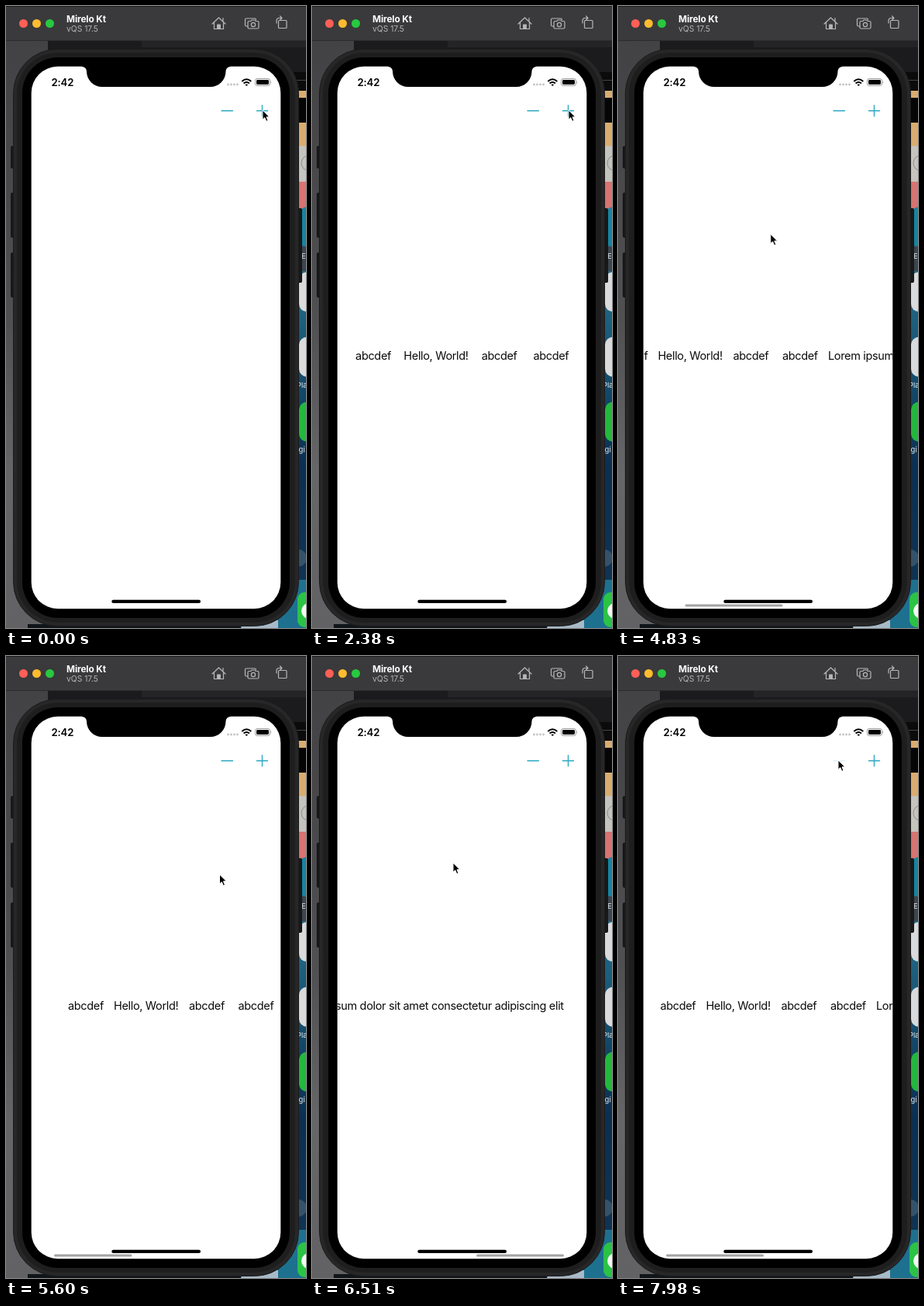
These frames come from a looping animation (387x800 px, 8 s). An HTML page:

```html
<!DOCTYPE html>
<html lang="en">
<head>
<meta charset="utf-8">
<title>Scrolling row</title>
<style>
html, body { margin: 0; width: 100%; height: 100%; overflow: hidden; background: #000; }
svg { display: block; width: 100vw; height: 100vh; }
text { font-family: Inter, "Liberation Sans", sans-serif; }
#row text { font-size: 14.5px; letter-spacing: -.34px; fill: #0a0a0a; }
.label { font-size: 9.5px; fill: #e4e8ea; }
.icon { fill: none; stroke: #b7b6b8; stroke-width: 1.2; stroke-linejoin: round; stroke-linecap: round; }
.tint { stroke: #2fa9c2; stroke-width: 1.4; stroke-linecap: round; fill: none; }
</style>
</head>
<body>
<svg viewBox="0 0 387 800" preserveAspectRatio="none">
  <defs>
    <linearGradient id="wall" x2="0" y2="1">
      <stop offset="0" stop-color="#414143"/><stop offset=".5" stop-color="#505052"/>
      <stop offset=".75" stop-color="#666668"/><stop offset="1" stop-color="#626265"/>
    </linearGradient>
    <linearGradient id="sea" x2="0" y2="1">
      <stop offset="0" stop-color="#3a86a0"/><stop offset=".4" stop-color="#1f6482"/>
      <stop offset=".7" stop-color="#0a2f51"/><stop offset="1" stop-color="#123553"/>
    </linearGradient>
    <clipPath id="screen"><rect x="33" y="78" width="321" height="697" rx="34"/></clipPath>
  </defs>

  <!-- desktop behind the device -->
  <rect width="387" height="800" fill="url(#wall)"/>
  <rect x="54" y="45" width="333" height="50" fill="#1b1b1d"/>
  <rect x="175" y="45" width="212" height="8" fill="#242426"/>
  <rect x="370" y="85" width="17" height="715" fill="#0b0b0b"/>
  <path d="M370 95.500h17" stroke="#444"/>
  <rect x="300" y="109" width="87" height="691" fill="url(#sea)"/>
  <rect x="370" y="109" width="17" height="71" fill="#d9ad70"/>
  <rect x="370" y="118" width="17" height="32" fill="#050505"/>
  <rect x="370" y="180" width="17" height="46" fill="#c5c3be"/>
  <circle cx="391" cy="202" r="10" fill="none" stroke="#8d8d8d"/>
  <rect x="370" y="226" width="17" height="35" fill="#d77370"/>
  <rect x="370" y="309" width="17" height="32" fill="#3b4650"/>
  <g id="apps"></g>
  <circle cx="377" cy="710" r="11" fill="#34536b"/>
  <rect x="340" y="738" width="47" height="62" fill="#1d718f"/>
  <rect x="376" y="754" width="36" height="45" rx="9" fill="#2bc346"/>
  <circle cx="391" cy="778" r="10" fill="#f3f8f3"/>
  <text class="label" x="381" y="325">E</text>
  <text class="label" x="375" y="491">Pla</text>
  <text class="label" x="372" y="574">ngi</text>
  <path d="M28 795h275v5h-275z" fill="#101519"/>
  <path d="M303 800q2-10 14-10h34v10z" fill="#a8bac8"/>

  <!-- device body -->
  <g fill="#18181a">
    <rect x="6" y="180" width="6" height="29" rx="2"/>
    <rect x="6" y="240" width="6" height="58" rx="2"/>
    <rect x="6" y="317" width="6" height="58" rx="2"/>
    <rect x="375" y="260" width="7" height="96" rx="2"/>
  </g>
  <rect x="9.500" y="55.500" width="368" height="742" rx="57" fill="#272728" stroke="#1b1b1c"/>
  <rect x="14" y="60" width="359" height="733" rx="53" fill="#1e1e1f"/>
  <rect x="21" y="66" width="345" height="721" rx="46" fill="#000"/>
  <rect x="32.700" y="77.800" width="321.600" height="697.400" rx="34" fill="#fff"/>

  <g clip-path="url(#screen)">
    <g id="row"></g>
    <rect id="thumb" y="769.500" height="3" rx="1.500" fill="#a3a3a3"/>
  </g>
  <path d="M98 77v1a6 6 0 0 1 6 6a20 20 0 0 0 20 20h139.500a20 20 0 0 0 20-20a6 6 0 0 1 6-6v-1z"/>
  <rect x="136.300" y="763.700" width="114.700" height="4.300" rx="2.100"/>

  <!-- status bar -->
  <text x="58.500" y="102.500" font-size="13.200" font-weight="600" letter-spacing="-.15">2:42</text>
  <path d="M286.500 101h13" stroke="#c3c3c5" stroke-width="2.800" stroke-linecap="round" stroke-dasharray="0 4"/>
  <g fill="none" stroke="#000" stroke-width="2">
    <path d="M304.300 97q6-5.400 12 0"/><path d="M306.600 99.600q3.700-3.300 7.400 0"/>
  </g>
  <path d="M308.500 101.200q1.800-1.500 3.600 0l-1.800 1.900z"/>
  <rect x="321.500" y="93.500" width="19" height="9" rx="2.600" fill="none" stroke="#9a9a9a"/>
  <rect x="323" y="95" width="16" height="6" rx="1.400"/>
  <path d="M341.700 96.500q1.800 1.500 0 3z" fill="#9a9a9a"/>

  <path id="minus" class="tint" d="M278 134.700h14.500"/>
  <path id="plus" class="tint" d="M323.500 134.700h14M330.500 127.700v14"/>

  <!-- window bar -->
  <rect width="387" height="45" fill="#3a393b"/>
  <path d="M0 .5h387" stroke="#1c1c1d"/>
  <path d="M0 44.500h387" stroke="#2b2a2c"/>
  <circle cx="22.500" cy="22.500" r="5.500" fill="#fe5f57"/>
  <circle cx="39.500" cy="22.500" r="5.500" fill="#febc2e"/>
  <circle cx="56.500" cy="22.500" r="5.500" fill="#28c840"/>
  <text x="78" y="21" font-size="11.800" font-weight="700" fill="#fff" letter-spacing="-.1">Mirelo Kt</text>
  <text x="78" y="33" font-size="10.300" fill="#b5b4b6">vQS 17.5</text>
  <g class="icon">
    <path d="M266 23l8.500-8 8.500 8M268.500 21.500v8h12v-8M280 19v-3.500"/>
    <path d="M272.700 29v-5h3.600v5z" fill="#b7b6b8"/>
    <path d="M312 26h-2q-1.500 0-1.500-1.500v-7q0-1.500 1.500-1.500h11q1.500 0 1.500 1.500"/>
    <path d="M313.500 19.500h2.500l1-1.500h4l1 1.500h2.500q1.500 0 1.500 1.500v6.500q0 1.500-1.500 1.500h-11q-1.500 0-1.500-1.500v-6.500q0-1.500 1.500-1.500z"/>
    <circle cx="319" cy="24" r="2.600"/>
    <rect x="351.500" y="18.500" width="10.500" height="10" rx="1"/>
    <path d="M349 22v-3q0-3.500 3.500-3.500h3M353.500 13l2.500 2.500-2.500 2.500"/>
  </g>

  <path id="cursor" d="M0 0v12.200l2.800-2.600 2 4.700 2.200-.9-2-4.600h3.900z" stroke="#fff"/>
</svg>
<script>
const LOOP = 8000, TICK = 70;
const LEFT = 33, WIDTH = 321, INSET = 14.7, GAP = 13.5;
const MAX = 347, BAR = 62, THUMB = 126, TRAVEL = 137;

const words = ["abcdef", "Hello, World!", "abcdef ", "abcdef",
  "Lorem ipsum dolor sit amet consectetur adipiscing elit"];
const widths = [45.5, 83.5, 50, 45.5, 351];
const clicks = [280, 910, 1330, 1960, 2870];

// [time, value] turning points of the drags and flicks
const swipes = [[3990, 0], [4550, 62], [4830, 62], [5320, 0], [5530, 0],
  [5740, -46], [6510, 360], [7140, -54.6], [7490, 0]];
// [time, x, y] rests of the pointer
const stops = [[3080, 331, 134], [3710, 223, 298], [4060, 223, 298], [4550, 180, 296],
  [5600, 275.5, 281], [6510, 182, 266], [7070, 363.5, 264], [7840, 284, 134]];

const $ = id => document.getElementById(id);
const clamp = (v, lo, hi) => Math.min(hi, Math.max(lo, v));
const mix = (a, b, p) => a + (b - a) * p;
const smooth = p => p * p * (3 - 2 * p);
const easeOut = p => 1 - (1 - p) ** 2;

function add(parent, tag, attrs, text = "") {
  const el = document.createElementNS("http://www.w3.org/2000/svg", tag);
  set(el, attrs);
  el.textContent = text;
  return parent.appendChild(el);
}
function set(el, attrs) {
  for (const name in attrs) el.setAttribute(name, attrs[name]);
}

function track(keys, t, col, ease) {
  let value = keys[0][col];
  for (let i = 1; i < keys.length; i++) {
    const [a, b] = [keys[i - 1][0], keys[i][0]];
    if (t > a) value = mix(keys[i - 1][col], keys[i][col], ease(clamp((t - a) / (b - a), 0, 1)));
  }
  return value;
}

// Padded cells share the spare width equally, each word centred in its cell.
function layout(count) {
  const cells = widths.slice(0, count).map(w => w + GAP);
  const spare = WIDTH - 2 * INSET - cells.reduce((a, b) => a + b);
  const extra = Math.max(0, spare / count);
  let x = LEFT + INSET;
  return cells.map(cell => {
    const start = x + (GAP + extra) / 2;
    x += cell + extra;
    return start;
  });
}
const layouts = words.map((_, i) => layout(i + 1));
const items = words.map(word => add($("row"), "text", { y: 455 }, word));

["#1684a2", "#d9dadb", "#d9dadb", "#23b83d"].forEach((fill, i) =>
  add($("apps"), "rect", { x: 378, y: 258.5 + i * 83.6, width: 30, height: 51, rx: 10, fill }));

function draw(t) {
  const shown = clicks.map(c => smooth(clamp((t - c - TICK) / 350, 0, 1)));
  const offset = track(swipes, t, 1, easeOut);
  items.forEach((el, i) => {
    let x = layouts[i][i];
    for (let n = i + 1; n < items.length; n++) x = mix(x, layouts[n][i], shown[n]);
    set(el, { x: x - offset, opacity: shown[i] });
  });

  const inside = clamp(offset, 0, MAX);
  const squeeze = Math.abs(offset - inside);
  set($("thumb"), {
    x: BAR + inside / MAX * TRAVEL + (offset > MAX ? squeeze : 0),
    width: THUMB - squeeze,
    opacity: t < swipes[0][0] ? 0 : 1
  });

  const pressed = clicks.some(c => t >= c - TICK && t < c + TICK);
  set($("plus"), { opacity: pressed ? .25 : 1 });
  set($("minus"), { opacity: t >= LOOP - 90 ? .15 : 1 });
  const [x, y] = [1, 2].map(col => track(stops, t, col, smooth));
  set($("cursor"), { transform: `translate(${x} ${y})` });
}

const begin = performance.now();
function frame() {
  const t = (performance.now() - begin) % LOOP;
  draw(Math.floor(t / TICK) * TICK);
  requestAnimationFrame(frame);
}
frame();
</script>
</body>
</html>
```
